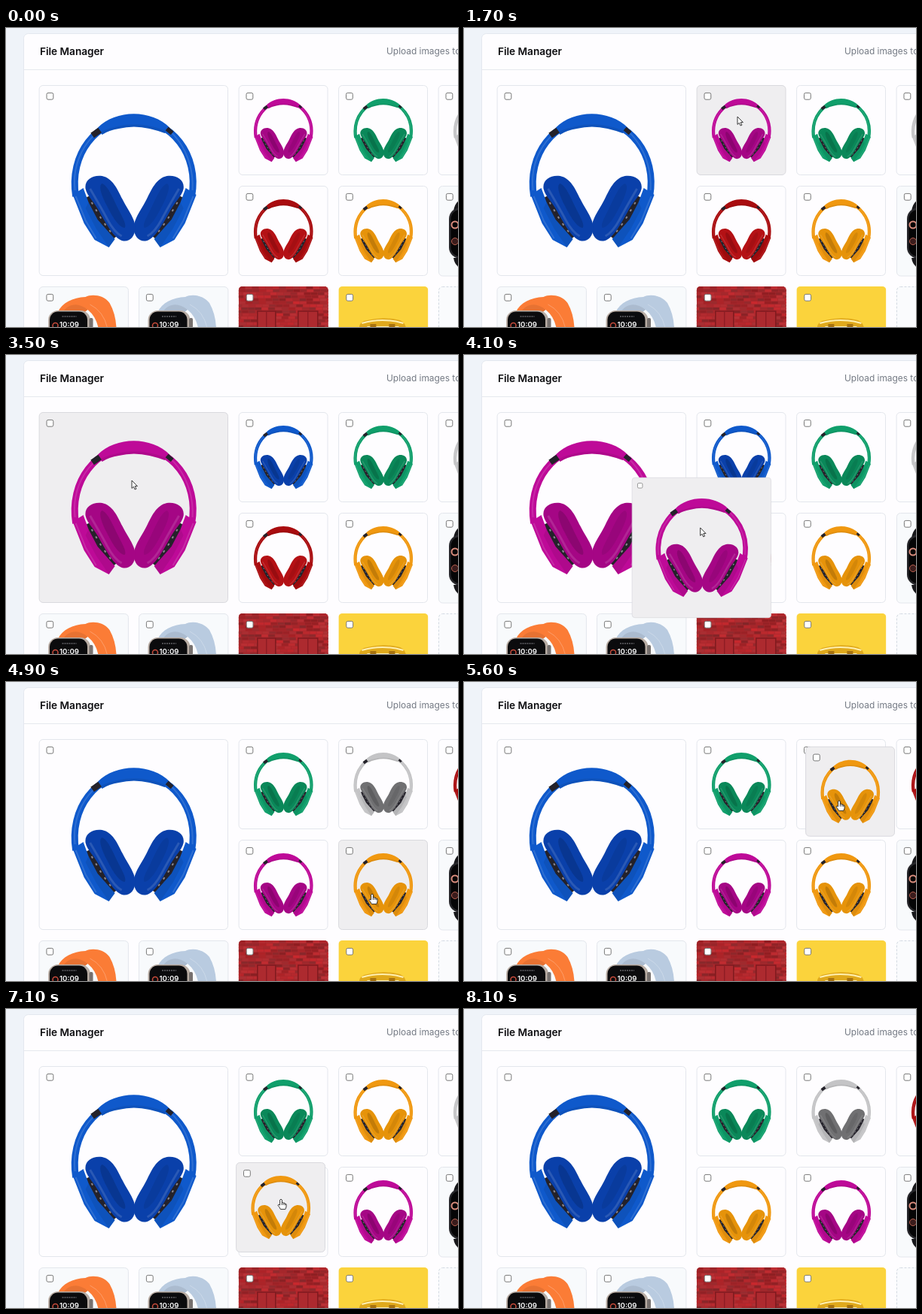
An HTML page that plays this animation: 600 by 398 pixels, repeating every 8.8 s.

```html
<!DOCTYPE html>
<html lang="en">
<head>
<meta charset="utf-8">
<title>File Manager</title>
<style>
html, body { margin: 0; width: 100%; height: 100%; overflow: hidden; background: #eff3f9; }
svg { display: block; }
text { font-family: Inter, sans-serif; }
.card { fill: #fefdff; stroke: #e3e6ec; }
.hover .card { fill: #efeef0; stroke: #d9d9de; }
.tint { fill: #f8fafc; stroke: #e3e6ec; }
.check { fill: #fff; stroke: #777; }
.band { fill: none; stroke: var(--band); }
.shell { fill: var(--band); }
.pad { fill: var(--pad); }
.shade { fill: #000; fill-opacity: .16; }
.soft { fill: #000; fill-opacity: .08; }
.shine { fill: none; stroke: #fff; stroke-opacity: .13; }
.dark { stroke: #24222a; fill: none; }
</style>
</head>
<body>
<svg width="600" height="398" viewBox="0 0 600 398">
  <defs>
    <g id="cup">
      <path class="dark" stroke-width="11" d="M66 148L82 178L101 203"/>
      <path stroke="#8a8790" stroke-width="2" stroke-dasharray="3 8" fill="none" d="M70 156L84 180L98 199"/>
      <path class="shell" d="M45 146L59 137L66 156L78 179L101 205L93 216L74 206L60 184Z"/>
      <path class="soft" d="M66 156L78 179L101 205L93 216L76 191L62 164Z"/>
      <path class="shine" stroke-width="2" d="M49 148L62 180L76 204"/>
      <path class="pad" d="M62 138C60 126 72 119 84 121C98 124 104 138 111 152C118 166 128 178 128 190C128 203 118 211 108 206C97 200 88 182 80 168C74 156 64 148 62 138Z"/>
      <path class="shine" stroke-width="3" d="M68 138C75 150 82 162 89 175C95 187 102 197 110 201"/>
      <path id="hole" class="soft" d="M84 131C92 134 98 150 105 164C111 176 117 186 114 190C106 190 97 174 90 160C84 148 78 134 84 131Z"/>
    </g>
    <g id="headphones">
      <path class="band" stroke-width="9" d="M49 148C40 92 76 46 126 46S213 92 203 148"/>
      <path class="shine" stroke-width="2" d="M48 140C42 92 76 46 126 44S207 92 204 140"/>
      <path class="shell" d="M78 57C102 32 150 32 174 57L167 64Q156 60 147 58Q126 53 106 58Q93 60 84 66Z"/>
      <path class="soft" d="M84 66Q93 60 106 58Q126 53 147 58Q156 60 167 64L169 61Q126 43 82 62Z"/>
      <path class="dark" stroke-width="8" d="M71 67L81 60"/>
      <path class="dark" stroke-width="6" d="M170 58L177 64"/>
      <use href="#cup" transform="translate(254) scale(-1 1)"/>
      <use href="#cup"/>
      <use href="#hole"/>
    </g>
    <rect id="check" class="check" x="10.4" y="10.4" width="8.8" height="8.8" rx="2"/>
    <g id="watch">
      <rect class="tint" x=".5" y=".5" width="118.4" height="120" rx="5"/>
      <path class="shell" d="M25 35C31 21 45 15 62 14C70 10 86 11 94 22Q102 36 103 55H79Q76 40 65 31L60 35Z"/>
      <path class="soft" d="M31 35C39 23 52 20 65 31L60 35Z"/>
      <path d="M68 24Q86 33 91 55" fill="none" stroke="#fff" stroke-opacity=".25"/>
      <rect x="12.5" y="32" width="56" height="60" rx="13" fill="#b9ada4"/>
      <rect x="14.5" y="33.5" width="50" height="60" rx="11" fill="#0b0b0d"/>
      <rect x="67" y="42" width="5" height="13" rx="2" fill="#77716f"/>
      <circle cx="22" cy="52" r="3.5" fill="none" stroke="#c84b3b" stroke-width="1.5"/>
      <path d="M31 40H50" stroke="#8b8b91" stroke-dasharray="2 1"/>
      <text x="27.5" y="54" font-size="9.6" font-weight="600" fill="#fff">10:09</text>
      <use href="#check"/>
    </g>
    <clipPath id="tile"><rect width="119" height="120" rx="5"/></clipPath>
  </defs>

  <rect width="600" height="398" fill="#eff3f9"/>
  <rect x="23.5" y="7.5" width="700" height="500" rx="6" fill="#fefdff" stroke="#e4e8ef"/>
  <path d="M24 55.5H600" stroke="#e6e9ee"/>
  <text x="45" y="36" font-size="13.6" font-weight="600" fill="#0b0b0e">File Manager</text>
  <text x="505" y="35" font-size="11.9" fill="#747a84">Upload images to</text>

  <use href="#watch" x="43.5" y="344" style="--band:#fb7c36"/>
  <use href="#watch" x="176" y="344" style="--band:#b9cbe0"/>

  <g transform="translate(308.8 344)" clip-path="url(#tile)">
    <rect width="119" height="120" fill="#a8282d"/>
    <g id="bricks"></g>
    <path d="M25 60V33H49V60M79 60V33H105V60" fill="#ad2a2f" stroke="#7f1a1f" stroke-width="1.5"/>
    <path d="M37 34V60M92 34V60" stroke="#811820"/>
    <use href="#check"/>
  </g>

  <g transform="translate(441.4 344)" clip-path="url(#tile)">
    <rect width="119" height="120" fill="#fbd33c"/>
    <path d="M28 60Q25 47 38 45Q58 40 77 44Q90 45 90 60Z" fill="#e0a91c"/>
    <path d="M31 49Q58 41 86 49M38 54H80" fill="none" stroke="#fff0b0" stroke-width="2"/>
    <path d="M42 60V50H50V60M67 60V50H75V60" fill="#a8730f"/>
    <use href="#check"/>
  </g>

  <rect x="574.5" y="344.5" width="118" height="120" rx="5" fill="#fafbfd" stroke="#d3d9e2" stroke-dasharray="3 2"/>

  <g transform="translate(574 210)">
    <rect class="tint" x=".5" y=".5" width="118" height="119.5" rx="5"/>
    <path d="M20 34Q22 20 32 18V36Z" fill="#17171a"/>
    <rect x="14" y="29" width="70" height="68" rx="15" fill="#26262a"/>
    <rect x="16.5" y="32" width="64" height="62" rx="12" fill="#050506"/>
    <circle cx="22" cy="52" r="4.5" fill="none" stroke="#d98c7c" stroke-width="2"/>
    <circle cx="22" cy="74" r="4.5" fill="#3a1c1c" stroke="#b9604f"/>
    <path d="M20 96H32V110Q22 108 20 96" fill="#17171a"/>
    <use href="#check"/>
  </g>

  <g id="cards"></g>
  <g id="cursor" fill="#fff" stroke="#222" stroke-width=".9" stroke-linejoin="round">
    <path id="arrow" d="M0 0V10.4L2.4 8.3L4.1 12L5.9 11.2L4.2 7.6H7.4Z"/>
    <path id="hand" d="M-1.4 1.2Q0-.9 1.4 1.2V5Q3 4.2 3.8 5.4Q5.2 4.9 5.8 6.2Q7.4 6.2 7.2 8.4Q7.2 11 5.8 13.6H-.6Q-2 10.5-4 8.4Q-4 6.4-1.4 8ZM1.4 5V8M3.8 5.4V8M5.8 6.2V8.4"/>
  </g>
</svg>
<script>
const LOOP = 8800, STEP = 100, SETTLE = 200;
const $ = id => document.getElementById(id);
const small = (col, row) => ({ x: 43.6 + col * 132.5, y: 76 + row * 134, w: 118.9, h: 120 });
const SLOTS = [{ x: 43.6, y: 76, w: 251.4, h: 254 },
  small(2, 0), small(3, 0), small(4, 0), small(2, 1), small(3, 1)];

const COLORS = {
  blue: ['#0f59cb', '#0a40aa'], magenta: ['#be0a98', '#a50685'],
  green: ['#109f6b', '#0a8859'], gray: ['#c4c4c6', '#707072'],
  red: ['#a90c0f', '#b41115'], orange: ['#f09810', '#e6930a']
};

// time, x, y of the pointer tip
const POINTER = [
  [0, 440, 440], [400, 440, 420], [1300, 363, 118], [1800, 363, 118],
  [2000, 340, 121], [2600, 220, 154], [3000, 167, 167], [3700, 167, 167],
  [4300, 365, 252], [4500, 380, 260], [4900, 486, 282], [5100, 486, 282],
  [5800, 501, 127], [6000, 501, 125], [6500, 501, 125], [7100, 365, 253],
  [7500, 360, 257], [8000, 440, 420], [8800, 440, 440]
];

const DRAGS = [
  { from: 1, to: 0, start: 1800, over: 2200, drop: 2900 },
  { from: 0, to: 4, start: 3700, over: 4000, drop: 4500 },
  { from: 5, to: 2, start: 5100, over: 5400, drop: 5900 },
  { from: 2, to: 4, start: 6500, over: 6800, drop: 7500 }
];

const clamp = v => Math.max(0, Math.min(1, v));
const ease = v => { v = clamp(v); return v * v * (3 - 2 * v); };
const mix = (a, b, p) => a + (b - a) * p;
const mixRect = (a, b, p) => ({
  x: mix(a.x, b.x, p), y: mix(a.y, b.y, p), w: mix(a.w, b.w, p), h: mix(a.h, b.h, p)
});

const orders = [Object.keys(COLORS)];
for (const d of DRAGS) {
  const next = [...orders.at(-1)];
  d.id = next.splice(d.from, 1)[0];
  next.splice(d.to, 0, d.id);
  orders.push(next);
}

function pointerAt(t) {
  const i = POINTER.findIndex(k => k[0] > t);
  const [a, b] = [POINTER[i - 1], POINTER[i]];
  const p = ease((t - a[0]) / (b[0] - a[0]));
  return { x: mix(a[1], b[1], p), y: mix(a[2], b[2], p) };
}

function overlayAt(d, t) {
  const src = SLOTS[d.from], grab = pointerAt(d.start), now = pointerAt(t);
  const k = mix(1, SLOTS[d.to].w / src.w, ease((t - d.over) / SETTLE));
  return { x: now.x - (grab.x - src.x) * k, y: now.y - (grab.y - src.y) * k, w: src.w, h: src.h, k };
}

function makeCard(id) {
  const g = document.createElementNS('http://www.w3.org/2000/svg', 'g');
  g.innerHTML = '<rect class="card" x=".5" y=".5" rx="5"/><use href="#headphones"/><use href="#check"/>';
  $('cards').append(g);
  return paint(g, id);
}

function paint(g, id) {
  g.style.setProperty('--band', COLORS[id][0]);
  g.style.setProperty('--pad', COLORS[id][1]);
  return g;
}

function place(g, { x, y, w, h, k = 1 }, hover) {
  g.setAttribute('transform', `translate(${x} ${y}) scale(${k})`);
  g.children[0].setAttribute('width', w - 1);
  g.children[0].setAttribute('height', h - 1);
  g.children[1].setAttribute('transform', `scale(${w / 251.4})`);
  g.classList.toggle('hover', hover);
}

const cards = Object.fromEntries(orders[0].map(id => [id, makeCard(id)]));
const overlay = makeCard('magenta');

function draw(t) {
  const done = DRAGS.filter(d => t >= d.drop).length;
  const last = DRAGS[done - 1], next = DRAGS[done];
  const active = next && t >= next.start ? next : null;
  const settle = last ? ease((t - last.drop) / SETTLE) : 1;
  const p = pointerAt(t);

  for (const id in cards) {
    let r = SLOTS[orders[done].indexOf(id)];
    const inside = p.x > r.x && p.x < r.x + r.w && p.y > r.y && p.y < r.y + r.h;
    if (settle < 1) {
      let old = SLOTS[orders[done - 1].indexOf(id)];
      if (id === last.id) {
        const o = overlayAt(last, last.drop);
        old = { x: o.x, y: o.y, w: o.w * o.k, h: o.h * o.k };
      }
      r = mixRect(old, r, settle);
    }
    place(cards[id], r, inside && !active);
  }
  if (last && cards[last.id].nextSibling !== overlay) overlay.before(cards[last.id]);

  overlay.style.display = active ? '' : 'none';
  if (active) place(paint(overlay, active.id), overlayAt(active, t), true);

  const hand = t >= 4700;
  $('arrow').style.display = hand ? 'none' : '';
  $('hand').style.display = hand ? '' : 'none';
  $('cursor').setAttribute('transform', `translate(${p.x} ${p.y})`);
}

// weathered bricks in slightly varied reds
let seed = 7;
const random = () => (seed = seed * 16807 % 2147483647) / 2147483647;
let bricks = '';
for (let y = 0; y < 60; y += 4) {
  for (let x = -random() * 9; x < 119; x += 9) {
    bricks += `<rect x="${x}" y="${y}" width="8.4" height="3.4" fill="hsl(358 ${55 + random() * 12}% ${33 + random() * 14}%)"/>`;
  }
}
$('bricks').innerHTML = bricks;

function tick() {
  draw(Math.floor(performance.now() % LOOP / STEP) * STEP);
  requestAnimationFrame(tick);
}
tick();
</script>
</body>
</html>
```
